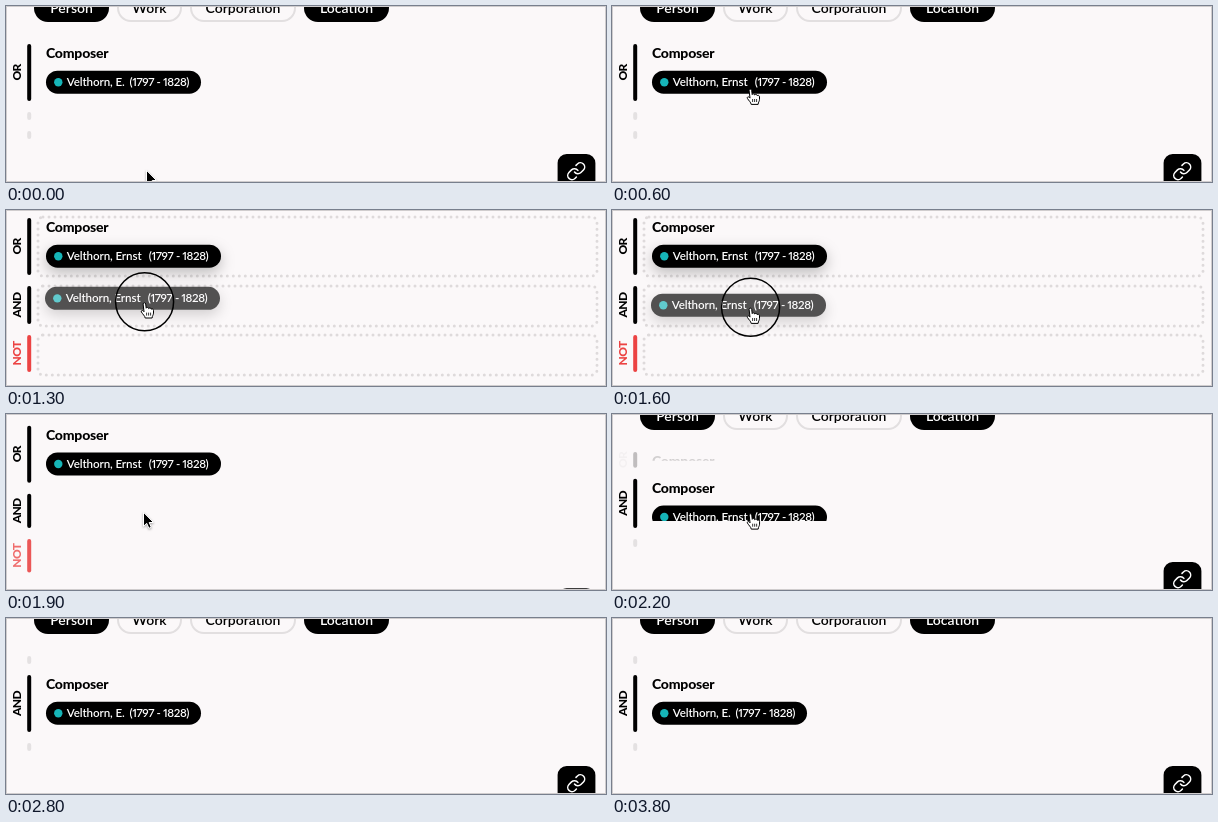
These frames come from a looping animation (600x176 px, 4100 ms). An HTML page:

```html
<!DOCTYPE html>
<html lang="en">
<head>
<meta charset="utf-8">
<title>Query builder</title>
<style>
  html, body { margin: 0; width: 100%; height: 100%; overflow: hidden; background: #fbf8f9; }
  svg { display: block; width: 600px; height: 176px; font-family: Lato, sans-serif; }
  .tag { font-size: 14px; font-weight: 600; text-anchor: middle; }
  .head { font-size: 14px; font-weight: 800; letter-spacing: -.2px; }
  .side { font-size: 12px; font-weight: 800; text-anchor: middle; letter-spacing: -.7px; }
  .name, .date { font-size: 11.6px; font-weight: 600; fill: #fff; letter-spacing: -.1px; }
  .date { font-variant-numeric: proportional-nums; letter-spacing: -.4px; }
  .zone { fill: none; stroke: #dedadb; stroke-width: 3; stroke-linecap: round; stroke-dasharray: 0 6; }
  .arrow { filter: drop-shadow(.5px 1px 1px rgba(0, 0, 0, .35)); }
</style>
</head>
<body>
<svg id="stage" viewBox="0 0 600 176"></svg>
<script>
const LOOP = 4100, STEP = 100;
const FULL = 57, SMALL = 8, GAP = 11;   // zone heights and spacing
const BLACK = [0, 0, 0], RED = [236, 67, 67], GREY = [228, 225, 226];
const svg = document.getElementById('stage');

function set(el, attrs) {
  for (const k in attrs) el.setAttribute(k, attrs[k]);
}
function add(parent, tag, attrs = {}, text) {
  const el = document.createElementNS('http://www.w3.org/2000/svg', tag);
  set(el, attrs);
  if (text) el.textContent = text;
  parent.append(el);
  return el;
}
const move = (el, x, y) => set(el, { transform: `translate(${x} ${y})` });
const show = (el, on) => set(el, { display: on ? 'inline' : 'none' });
const mix = (a, b, k) => a + (b - a) * k;

const ramp = (t, from, to) => Math.min(1, Math.max(0, (t - from) / (to - from)));
const easeIn = k => k * k;
const easeOut = k => 1 - (1 - k) ** 2;
const easeBoth = k => k < .5 ? 2 * k * k : 1 - 2 * (1 - k) ** 2;

const defs = add(svg, 'defs');
add(svg, 'rect', { width: 600, height: 176, fill: '#fbf8f9' });

// Dotted drop zones
const zones = add(svg, 'g');
for (const [y, height] of [[7, 59], [76, 40], [125, 40]])
  add(zones, 'rect', { class: 'zone', x: 32, y, width: 559, height, rx: 5 });

// Filter tags along the top
const tags = add(svg, 'g');
function tag(x, w, label, dark) {
  const d = dark ? 0 : 1;
  add(tags, 'rect', { x: x + d, y: -12 + d, width: w - 2 * d, height: 28 - 2 * d, rx: 14 - d,
    fill: dark ? '#000' : '#fbf8f9', stroke: dark ? 'none' : '#e2dfe0', 'stroke-width': 2 });
  add(tags, 'text', { class: 'tag', x: x + w / 2, y: 7, fill: dark ? '#fff' : '#000' }, label);
}
tag(28, 75, 'Person', true);
tag(111, 65, 'Work', false);
tag(184, 106, 'Corporation', false);
tag(298, 85, 'Location', true);

// Side bar with an upright label; greys out as `on` falls to 0
function side(label, rgb) {
  const bar = add(svg, 'rect', { x: 21.2, width: 4, rx: 2 });
  const text = add(svg, 'text', { class: 'side', fill: `rgb(${rgb})` }, label);
  return (top, height, on) => {
    set(bar, { y: top, height, fill: `rgb(${rgb.map((c, i) => Math.round(mix(GREY[i], c, on)))})` });
    set(text, { transform: `translate(14.5 ${top + height / 2}) rotate(-90)`, opacity: easeIn(on) });
  };
}
const orSide = side('OR', BLACK), andSide = side('AND', BLACK), notSide = side('NOT', RED);

let clips = 0;
function clipBox(attrs) {
  const id = 'clip' + clips++;
  const rect = add(add(defs, 'clipPath', { id }), 'rect', attrs);
  return { rect, url: `url(#${id})` };
}

// Name chip, drawn from its top left corner
function chip(parent) {
  const g = add(parent, 'g');
  const back = add(g, 'rect', { height: 23, rx: 11.5 });
  add(g, 'circle', { cx: 12.3, cy: 11.5, r: 4.2, fill: '#16b5b8' });
  const clip = clipBox({ x: 20, height: 23 });
  const name = add(add(g, 'g', { 'clip-path': clip.url }), 'text', { class: 'name', x: 20.7, y: 15.2 });
  const date = add(g, 'text', { class: 'date', y: 15.2 }, '(1797 - 1828)');
  return {
    g,
    draw(open, lift) {
      const x = mix(83.5, 102.8, open);
      set(back, { width: mix(155, 175, open) });
      set(clip.rect, { width: x - 21 });
      set(date, { x });
      name.textContent = open > 0 ? 'Velthorn, Ernst' : 'Velthorn, E.';
      g.style.filter = lift ? `drop-shadow(0 5px 7px rgba(0,0,0,${.25 * lift}))` : 'none';
    }
  };
}

// Heading and chip inside a zone
function content() {
  const clip = clipBox({ x: 28, width: 560 });
  const g = add(add(svg, 'g', { 'clip-path': clip.url }), 'g');
  add(g, 'text', { class: 'head', x: 40, y: 14.4 }, 'Composer');
  const pill = chip(g);
  move(pill.g, 40, 26.7);
  return (top, h, opacity, open, lift) => {
    set(clip.rect, { y: top, height: h < FULL ? h - 7 : h + 30 });
    move(g, 0, top);
    set(g, { opacity });
    pill.draw(open, lift);
  };
}
const orContent = content(), andContent = content();

// Link button
const link = add(svg, 'g');
add(link, 'rect', { x: 551.6, y: 148, width: 37.8, height: 37.8, rx: 9 });
add(link, 'path', {
  transform: 'translate(560 155) scale(.85)', fill: 'none', stroke: '#fff', 'stroke-width': 1.8, 'stroke-linecap': 'round',
  d: 'M10 13a5 5 0 0 0 7.54.54l3-3a5 5 0 0 0-7.07-7.07l-1.72 1.71M14 11a5 5 0 0 0-7.54-.54l-3 3a5 5 0 0 0 7.07 7.07l1.71-1.71'
});

// Dragged copy, press ring and pointers
const ghost = chip(svg);
set(ghost.g, { opacity: .67 });
const ring = add(svg, 'circle', { cx: 138.6, fill: 'none', stroke: '#000', 'stroke-width': 1.5 });
const arrow = add(svg, 'path', {
  class: 'arrow', stroke: '#fff', 'stroke-width': 1, 'stroke-linejoin': 'round',
  d: 'M0 0V14L3.2 11L5.4 16L7.8 15L5.7 10.2H10Z'
});
const hand = add(svg, 'g');
add(hand, 'path', {
  fill: '#fff', stroke: '#000', 'stroke-width': 1, 'stroke-linejoin': 'round',
  d: 'M-1.3 1.4C-1.3-.3 1.2-.3 1.3 1.4L1.8 5.6C2.1 4.5 4.2 4.6 4.3 6C4.9 5 6.7 5.3 6.8 6.6C7.6 5.9 9.1 6.4 9.1 7.8V10.5C9.1 12.3 7.9 13 7.7 15.4H.8C.5 13.3-1.6 11.7-3 9.4C-3.7 8-2 7.3-1 8.4L-.4 9.1Z'
});
add(hand, 'path', { d: 'M2.2 10V13M4.2 10V13M6.2 10V13', stroke: '#000', 'stroke-width': .8 });

add(svg, 'rect', { x: .5, y: .5, width: 599, height: 175, fill: 'none', stroke: '#d0cdce' });

function draw(t) {
  // Zones spread while dragging, then settle with OR collapsed
  const spread = ramp(t, 1100, 1300);
  const wide = spread - easeBoth(ramp(t, 1800, 2200));
  const fold = easeOut(ramp(t, 1900, 2400));
  const scroll = 30 * wide;
  const orTop = 38 - scroll, orH = mix(FULL, SMALL, fold);
  const andTop = orTop + orH + GAP, andH = 114 - andTop;

  move(tags, 0, -scroll);
  move(link, 0, scroll);
  set(zones, { opacity: spread - ramp(t, 1700, 1900) });
  orSide(orTop, orH, 1 - fold);
  andSide(andTop, andH, spread);
  notSide(125, mix(SMALL, 37, wide), wide);

  const held = t >= 700 && t < 1800;
  const lift = held ? ramp(t, 600, 900) : 0;
  const open = ramp(t, 400, 600) - ramp(t, 2300, 2600);
  orContent(orTop, orH, 1 - fold, open, lift);
  andContent(andTop, andH, ramp(t, 1900, 2200), open, 0);

  // Pointer comes in, drags down, then leaves
  const drag = easeOut(ramp(t, 1100, 1600));
  const come = easeBoth(ramp(t, 0, 600)), leave = easeIn(ramp(t, 2100, 2800));
  const x = 141 - 3 * come + 3 * leave;
  const y = 164 - 81 * come + 15 * drag + 84 * leave;

  show(ghost.g, held);
  ghost.draw(1, lift);
  move(ghost.g, 40 - spread, 64.7 + 19 * drag);
  show(ring, held);
  set(ring, { cy: y - .8, r: 34 - 5 * lift, opacity: lift });

  const pointing = (t >= 500 && t < 1800) || (t >= 2100 && t < 2400);
  show(hand, pointing);
  show(arrow, !pointing && t < 2800);
  move(hand, x + .4, y);
  move(arrow, x - .5, y + .3);
}

const start = performance.now();
function tick() {
  const t = (performance.now() - start) % LOOP;
  draw(Math.floor(t / STEP) * STEP);
  requestAnimationFrame(tick);
}
tick();
</script>
</body>
</html>
```
